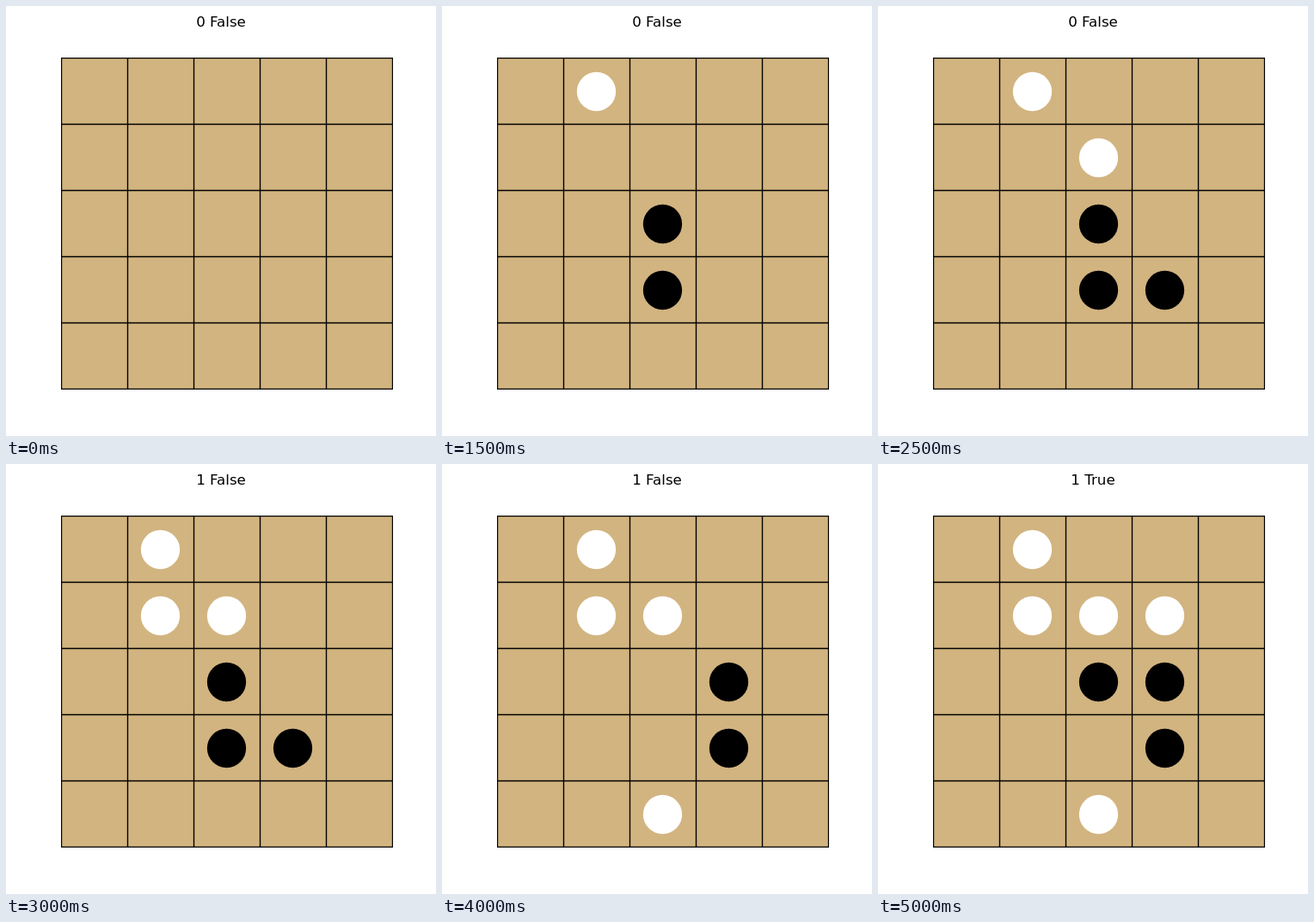
An HTML page for the animation above (5500 ms loop, 500 px wide and 500 px high).

```html
<!DOCTYPE html>
<html lang="en">
<head>
<meta charset="utf-8">
<title>Board game</title>
<style>
  html, body { margin: 0; width: 100%; height: 100%; overflow: hidden; background: #fff; }
  svg { display: block; width: 500px; height: 500px; }
  text { font: 16.667px "DejaVu Sans", sans-serif; text-anchor: middle; }
  .grid { stroke: #000; stroke-width: 1.39; fill: none; }
</style>
</head>
<body>
<svg viewBox="0 0 500 500">
  <clipPath id="board"><rect x="64" y="60" width="386" height="386"/></clipPath>
  <text id="title" x="250" y="24">0 False</text>
  <g clip-path="url(#board)">
    <rect x="64" y="60" width="386" height="386" fill="#d2b480"/>
    <path id="grid" class="grid"/>
  </g>
  <g id="stones"></g>
</svg>
<script>
const STEP = 500, STEPS = 11, CELL = 77;
const $ = id => document.getElementById(id);

const stones = [
  [2, 2, 'black', 1, 8],
  [1, 0, 'white', 2],
  [2, 3, 'black', 3, 8],
  [2, 1, 'white', 4],
  [3, 3, 'black', 5],
  [1, 1, 'white', 6],
  [3, 2, 'black', 7],
  [2, 4, 'white', 8],
  [2, 2, 'black', 9],
  [3, 1, 'white', 10]
].map(([col, row, fill, from, to = STEPS]) => {
  const el = document.createElementNS('http://www.w3.org/2000/svg', 'circle');
  const attrs = { cx: 102.5 + col * CELL, cy: 99.5 + row * CELL, r: 22.65, fill };
  for (const name in attrs) el.setAttribute(name, attrs[name]);
  $('stones').append(el);
  return { el, from, to };
});

let lines = '';
for (let i = 0; i <= 5; i++) {
  lines += `M${64.5 + i * CELL} 60V446M64 ${60.5 + i * CELL}H450`;
}
$('grid').setAttribute('d', lines);

let shown = -1;
function show(step) {
  if (step === shown) return;
  shown = step;
  for (const { el, from, to } of stones) {
    el.style.visibility = step >= from && step < to ? 'visible' : 'hidden';
  }
  const player = step > 0 && step % 2 === 0 ? 1 : 0;
  $('title').textContent = `${player} ${step === STEPS - 1 ? 'True' : 'False'}`;
}

const start = performance.now();
function tick() {
  show(Math.floor((performance.now() - start) / STEP) % STEPS);
  requestAnimationFrame(tick);
}
show(0);
requestAnimationFrame(tick);
</script>
</body>
</html>
```
